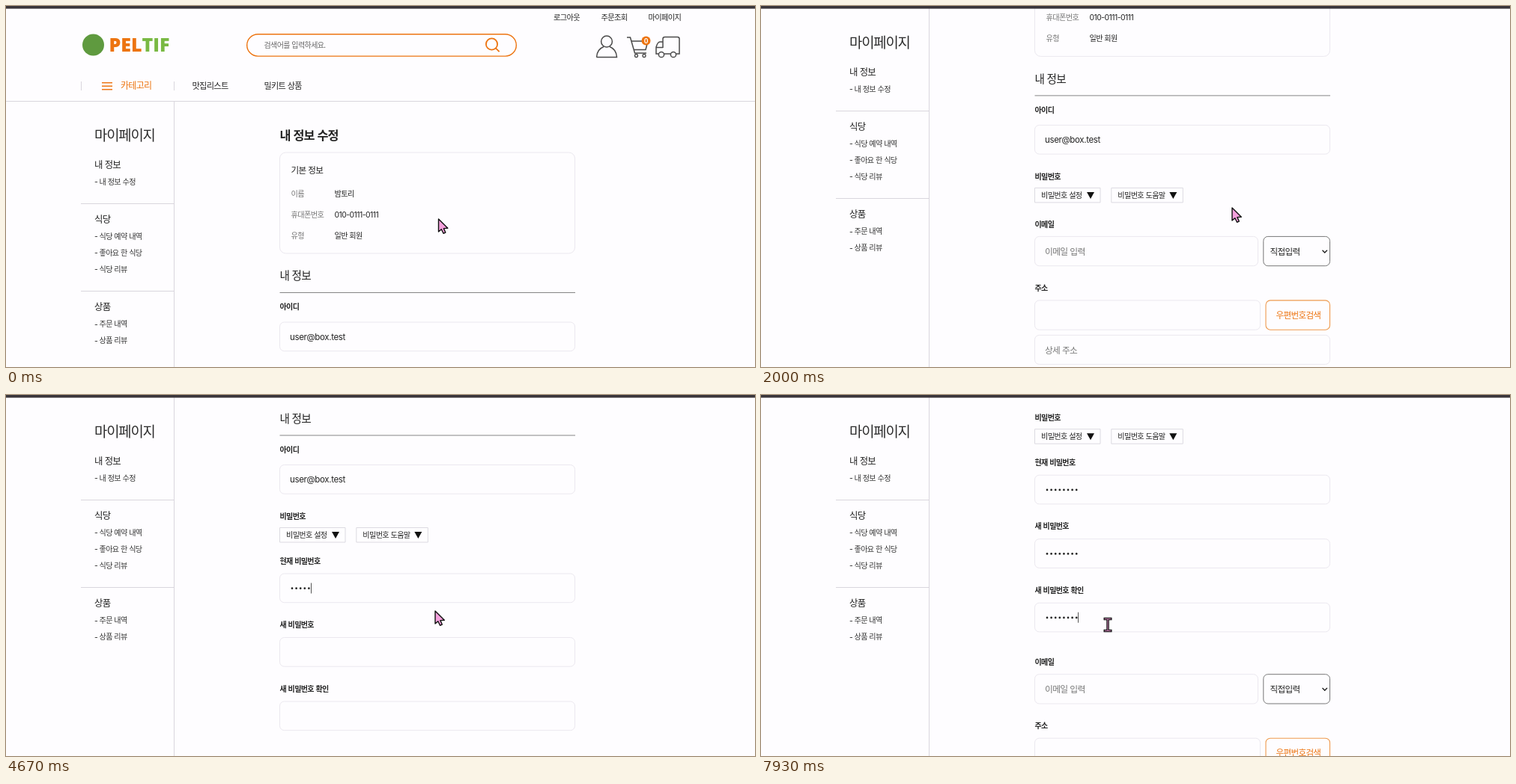
An HTML page with a canvas that plays this animation: 1000 px wide and 483 px high, repeating every 8 s.

```html
<!DOCTYPE html>
<html lang="ko">
<head>
<meta charset="utf-8">
<title>마이페이지</title>
<style>
  html, body { margin: 0; width: 100%; height: 100%; overflow: hidden; background: #fefdff; }
  canvas { display: block; width: 1000px; height: 483px; }
</style>
</head>
<body>
<canvas id="stage"></canvas>
<script>
const W = 1000, H = 483, LOOP = 8000, TICK = 1000 / 15;
const INK = '#222', GREY = '#777', PALE = '#ebe8ef', RULE = '#d9d6dd', ORANGE = '#ed7410';
const HANGUL = '"Noto Sans CJK KR", "Noto Sans CJK", "Noto Sans KR", sans-serif';
const LATIN = 'Inter, sans-serif';

const canvas = document.getElementById('stage');
const ratio = window.devicePixelRatio || 1;
canvas.width = W * ratio;
canvas.height = H * ratio;
const ctx = canvas.getContext('2d');

const NOTCH = 65.9, NOTCH_MS = 180;
const NOTCHES = [975, 1155, 1335, 1515, 3028, 6487, 6660];
const OPEN_AT = 2730, OPEN_GAP = 263, STICKY = 124;

// Pointer stops: time, x, y, shape on arrival
const STOPS = [
  [0, 577.5, 285, 'arrow'], [100, 577.5, 285, 'arrow'], [800, 644, 266, 'arrow'],
  [1730, 644, 266, 'arrow'], [1980, 629, 270, 'arrow'], [2120, 629, 270, 'arrow'],
  [2550, 425, 249, 'hand'], [2790, 425, 249, 'hand'], [3050, 541, 246, 'hand'],
  [3480, 541, 246, 'hand'], [3900, 560, 260, 'beam'], [4060, 560, 260, 'beam'],
  [4280, 573, 289, 'arrow'], [4980, 573, 289, 'arrow'], [5270, 493, 345, 'beam'],
  [6880, 493, 345, 'beam'], [7070, 463, 307.5, 'beam'], [LOOP, 463, 307.5, 'beam']
];

// Password fields: label, label y, focus time, first key, ms per key
const FIELDS = [
  ['현재 비밀번호', 551.5, 4000, 4200, 110],
  ['새 비밀번호', 637, 5350, 5550, 100],
  ['새 비밀번호 확인', 722.5, 7070, 7200, 80]
];

const clamp = (v, a, b) => Math.min(b, Math.max(a, v));
const smooth = u => { u = clamp(u, 0, 1); return u * u * (3 - 2 * u); };
const scrollAt = t => NOTCHES.reduce((s, n) => s + NOTCH * smooth((t - n) / NOTCH_MS), 0);

function text(str, x, y, size, color = INK, weight = 400, family = HANGUL, gap = -0.06) {
  ctx.font = `${weight} ${size}px ${family}`;
  ctx.letterSpacing = `${gap * size}px`;
  ctx.wordSpacing = `${0.08 * size}px`;
  ctx.fillStyle = color;
  ctx.fillText(str, x, y + size * 0.37);
}

function stroke(color, width = 1) {
  ctx.strokeStyle = color;
  ctx.lineWidth = width;
  ctx.stroke();
}

function line(points, color, width = 1) {
  ctx.beginPath();
  points.forEach(([x, y]) => ctx.lineTo(x, y));
  stroke(color, width);
}

function box(x, y, w, h, r, color = PALE, width = 1) {
  ctx.beginPath();
  ctx.roundRect(x, y, w, h, r);
  stroke(color, width);
}

function circle(x, y, r) {
  ctx.beginPath();
  ctx.arc(x, y, r, 0, Math.PI * 2);
}

function disc(x, y, r, color) {
  circle(x, y, r);
  ctx.fillStyle = color;
  ctx.fill();
}

function ring(x, y, r, color, width) {
  circle(x, y, r);
  stroke(color, width);
}

function icons() {
  const c = '#4a4a4a', w = 1.5;
  ring(802, 47.5, 7.4, c, w);
  ctx.beginPath();
  ctx.moveTo(788.5, 68.5);
  ctx.bezierCurveTo(789, 60, 794, 56, 798, 54.5);
  ctx.moveTo(806, 54.5);
  ctx.bezierCurveTo(810, 56, 815, 60, 815.5, 68.5);
  ctx.lineTo(788.5, 68.5);
  stroke(c, w);

  line([[829, 42], [833.5, 42], [839.5, 63], [855, 63]], c, w);
  line([[835, 47], [857, 47], [854, 58.5], [838.5, 58.5]], c, w);
  ring(841.5, 66.5, 2, c, 1.3);
  ring(852, 66.5, 2, c, 1.3);
  disc(854.5, 46.5, 6, ORANGE);
  text('0', 851.8, 46.5, 8.5, '#fff', 700, LATIN, 0);

  ctx.beginPath();
  ctx.moveTo(871, 64);
  ctx.lineTo(868, 64);
  ctx.lineTo(868, 55);
  ctx.quadraticCurveTo(870, 48, 873, 48);
  ctx.lineTo(877, 48);
  ctx.moveTo(868, 55.5);
  ctx.lineTo(877, 55.5);
  ctx.moveTo(877, 56);
  ctx.lineTo(877, 44);
  ctx.quadraticCurveTo(877, 41.5, 879.5, 41.5);
  ctx.lineTo(896.5, 41.5);
  ctx.quadraticCurveTo(899, 41.5, 899, 44);
  ctx.lineTo(899, 64);
  ctx.lineTo(895, 64);
  ctx.moveTo(879, 64);
  ctx.lineTo(887, 64);
  stroke(c, w);
  ring(875, 65, 3.6, c, w);
  ring(891, 65, 3.6, c, w);
}

function header() {
  text('로그아웃', 731, 15.5, 10.2);
  text('주문조회', 794.5, 15.5, 10.2);
  text('마이페이지', 857.5, 15.5, 10.2);

  disc(116.5, 52, 14.5, '#5f9a3f');
  const brand = '"Open Sans", sans-serif';
  text('PEL', 137.5, 51.8, 25, ORANGE, 800, brand, 0);
  const half = ctx.measureText('PEL').width;
  text('TIF', 137.5 + half, 51.8, 25, '#79b943', 800, brand, 0);

  box(321.7, 37.7, 359.6, 29.4, 14.7, ORANGE, 1.4);
  text('검색어를 입력하세요.', 344.5, 52, 10, '#666');
  ring(648.5, 51, 7.6, ORANGE, 1.8);
  line([[653.8, 56.4], [658.6, 61.2]], ORANGE, 1.8);
  icons();

  for (const x of [100.5, 224.5]) line([[x, 101], [x, 113]], RULE);
  for (const y of [102.7, 107.2, 111.7]) line([[128, y], [142, y]], ORANGE, 1.5);
  text('카테고리', 153, 107, 12, ORANGE, 500);
  text('맛집리스트', 248.5, 107, 11.2);
  text('밀키트 상품', 344.5, 107, 11.1);
  line([[0, 127.5], [W, 127.5]], RULE);
}

function sidebar() {
  const group = (name, y, items) => {
    text(name, 118, y, 12.4);
    items.forEach((item, i) => {
      const iy = y + 23 + i * 22;
      text('-', 118, iy, 10.4, INK, 400, LATIN, 0);
      text(item, 124.5, iy, 10.1, '#333');
    });
  };
  text('마이페이지', 118, 173, 18.8, '#2c2c2c', 500);
  group('내 정보', 212, ['내 정보 수정']);
  line([[100, 264.5], [224, 264.5]], RULE);
  group('식당', 285.5, ['식당 예약 내역', '좋아요 한 식당', '식당 리뷰']);
  line([[100, 381.5], [224, 381.5]], RULE);
  group('상품', 402.7, ['주문 내역', '상품 리뷰']);
}

function toggle(label, x, w) {
  ctx.beginPath();
  ctx.rect(x, 507, w, 19.5);
  stroke('#dcdae1');
  text(label, x + 8.5, 517, 10.1);
  const cx = x + w - 13;
  ctx.beginPath();
  ctx.moveTo(cx - 5, 512.5);
  ctx.lineTo(cx + 5, 512.5);
  ctx.lineTo(cx, 521.5);
  ctx.fillStyle = '#111';
  ctx.fill();
}

const label = (str, y) => text(str, 365.5, y, 10, INK, 600);

function passwords(t) {
  FIELDS.forEach(([name, y, focus, start, step], i) => {
    label(name, y);
    box(365.5, y + 17, 394, 38.7, 6);
    const typed = clamp(Math.floor((t - start) / step) + 1, 0, 8);
    for (let k = 0; k < typed; k++) disc(382 + k * 5.6, y + 36.7, 1.35, INK);

    const blur = i < 2 ? FIELDS[i + 1][2] : LOOP;
    const last = typed ? start + (typed - 1) * step : focus;
    if (t >= focus && t < blur && (t - last) % 1000 < 500) {
      const x = Math.round(379.6 + typed * 5.6) - 0.5;
      line([[x, y + 29.5], [x, y + 43.5]], '#555');
    }
  });
}

function contact() {
  label('이메일', 555.5);
  box(365.5, 572, 298, 39.3, 6);
  text('이메일 입력', 379, 592, 11.8, GREY);
  box(670.8, 572, 88.7, 39.3, 6, '#777');
  text('직접입력', 679.5, 592, 11.6);
  line([[749.5, 590.3], [752.7, 593.5], [755.9, 590.3]], INK, 1.4);

  label('주소', 641);
  box(365.5, 657.5, 301, 39.3, 6);
  box(674, 657.5, 85.5, 39.3, 6, '#ee9a4e', 1.1);
  text('우편번호검색', 687.5, 677, 11.6, ORANGE);
  box(365.5, 704, 394, 39, 6);
  text('상세 주소', 379, 724, 11.7, GREY);
}

function content(t) {
  text('내 정보 수정', 365.5, 172.5, 16.3, INK, 600);
  box(365.5, 196, 394, 135, 8);
  text('기본 정보', 380.5, 219.5, 11.6, INK, 500);
  text('이름', 380.5, 251, 10.2, GREY);
  text('휴대폰번호', 380.5, 279, 10.2, GREY);
  text('유형', 380.5, 307, 10.2, GREY);
  text('밤토리', 438.5, 251, 10.2);
  text('010-0111-0111', 438.5, 279, 10.4, INK, 400, LATIN, -0.05);
  text('일반 회원', 438.5, 307, 10.1);

  text('내 정보', 365.5, 361, 14.6);
  line([[365.5, 383.5], [760, 383.5]], '#858585');
  label('아이디', 402.5);
  box(365.5, 423, 394, 38.7, 6);
  text('user@box.test', 379, 442.5, 11.5, INK, 400, LATIN, -0.03);

  label('비밀번호', 491.5);
  toggle('비밀번호 설정', 365.5, 87.5);
  toggle('비밀번호 도움말', 467.8, 95.5);

  const open = t >= OPEN_AT;
  if (open) passwords(t);
  ctx.save();
  ctx.translate(0, open ? OPEN_GAP : 0);
  contact();
  ctx.restore();
}

const POINTERS = {
  arrow() {
    ctx.beginPath();
    [[0, 0], [0, 17], [3.8, 13.8], [6.5, 19.3], [9.3, 18], [6.9, 12.6], [12.3, 12.3]]
      .forEach(([x, y]) => ctx.lineTo(x, y));
    ctx.closePath();
  },
  hand() {
    ctx.beginPath();
    ctx.moveTo(-2, 13);
    ctx.lineTo(-2, 2);
    ctx.quadraticCurveTo(0, -1, 2, 2);
    ctx.lineTo(2, 8);
    ctx.quadraticCurveTo(4, 6, 5.3, 8.6);
    ctx.quadraticCurveTo(7.2, 7.6, 8, 9.8);
    ctx.quadraticCurveTo(9.6, 9.5, 9.6, 12);
    ctx.quadraticCurveTo(9.8, 18, 6.5, 21.5);
    ctx.lineTo(-2, 21.5);
    ctx.quadraticCurveTo(-5, 18, -8.5, 12.5);
    ctx.quadraticCurveTo(-7.5, 9.5, -4.5, 12);
    ctx.closePath();
  }
};

function beam() {
  const bars = (color, width, cut) => {
    line([[-5.5 + cut, -8], [5.5 - cut, -8]], color, width);
    line([[-5.5 + cut, 8], [5.5 - cut, 8]], color, width);
    line([[0, -8], [0, 8]], color, width);
  };
  bars('#111', 3.5, 0);
  bars('#c07aaa', 1.2, 1.2);
}

function pointer(t) {
  const i = Math.max(1, STOPS.findIndex(s => s[0] > t));
  const a = STOPS[i - 1], b = STOPS[i];
  const u = smooth((t - a[0]) / (b[0] - a[0]));
  const kind = u > 0.8 ? b[3] : u < 0.2 || a[3] === b[3] ? a[3] : 'arrow';
  ctx.save();
  ctx.translate(a[1] + (b[1] - a[1]) * u, a[2] + (b[2] - a[2]) * u);
  if (kind === 'beam') beam();
  else {
    POINTERS[kind]();
    ctx.lineJoin = 'round';
    ctx.fillStyle = '#f3a0dc';
    ctx.fill();
    stroke('#111', 1.4);
    if (kind === 'hand') {
      for (const x of [2, 5.3]) line([[x, 8.5], [x, 12]], '#111', 1.1);
    }
  }
  ctx.restore();
}

function draw(t) {
  const scroll = scrollAt(t);
  ctx.setTransform(ratio, 0, 0, ratio, 0, 0);
  ctx.fillStyle = '#fefdff';
  ctx.fillRect(0, 0, W, H);

  line([[224.5, Math.max(0, 127 - scroll)], [224.5, H]], RULE);
  ctx.save();
  ctx.translate(0, -scroll);
  header();
  content(t);
  ctx.restore();

  ctx.save();
  ctx.translate(0, -Math.min(scroll, STICKY));
  sidebar();
  ctx.restore();

  ctx.fillStyle = '#3a353a';
  ctx.fillRect(0, 0, W, 3.6);
  pointer(t);
}

function frame() {
  const t = performance.now() % LOOP;
  draw(Math.floor(t / TICK) * TICK);
  requestAnimationFrame(frame);
}
frame();
</script>
</body>
</html>
```
